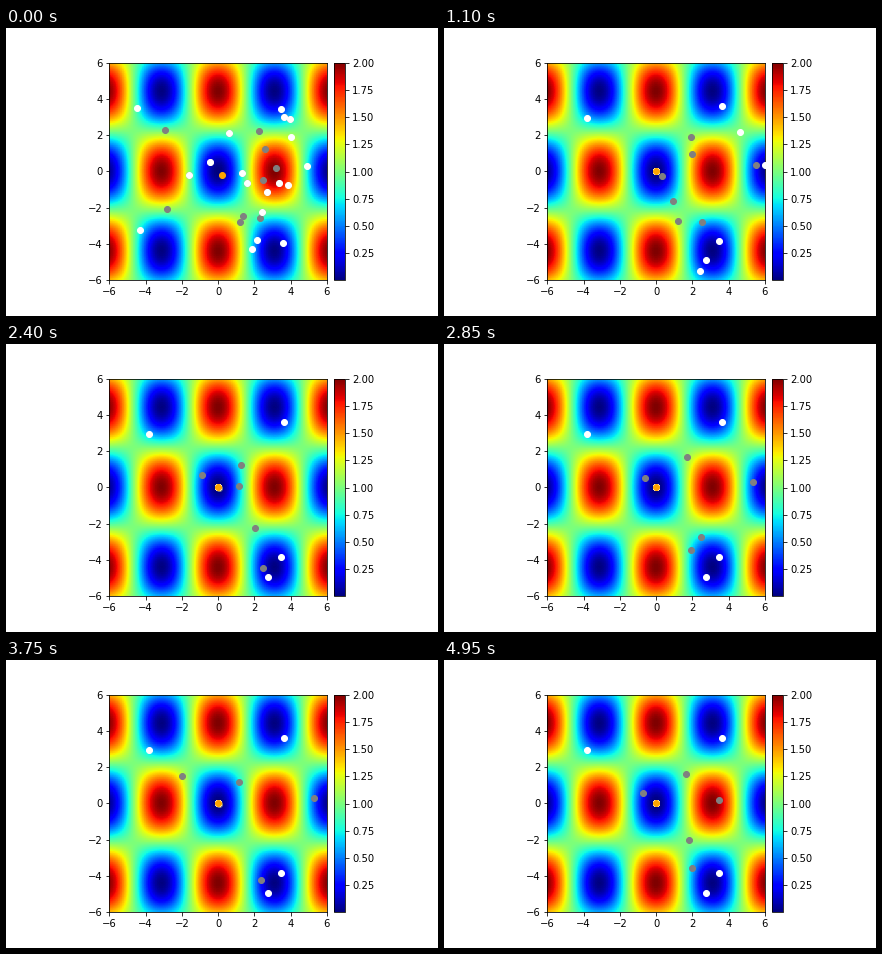
Animation of 432 by 288 pixels, one loop 5 s. Source, as a matplotlib script:

```python
import numpy as np
import matplotlib.pyplot as plt
from matplotlib.animation import FuncAnimation
from mpl_toolkits.axes_grid1 import make_axes_locatable

STEPS = 100
SETTLE = 30  # step at which the last stragglers leave the side basins

# Starting personal bests; the first seven get trapped in side basins
STARTS = np.array([
    (-4.49, 3.49), (3.48, 3.41), (3.57, -3.98), (2.13, -3.79), (4.89, 0.29),
    (1.88, -4.29), (4.01, 1.89), (-4.32, -3.24), (3.84, -0.73), (0.59, 2.11),
    (-0.43, 0.51), (-1.62, -0.23), (1.30, -0.12), (1.58, -0.67),
    (2.71, -1.17), (3.35, -0.67), (3.62, 3.00), (3.95, 2.88), (2.41, -2.25)])
TRAPPED = 7
# Drift of the trapped bests along their rays, before and after settling
GROWTH = np.array([0.85, 1.05, 0.97, 1.30, 1.23, 1.29, 1.15])[:, None]
LATE = np.array([1, 1, 1, 1, 1.05, 0, 0])[:, None]


def griewank(x, y):
    return 1 + (x**2 + y**2) / 4000 - np.cos(x) * np.cos(y / np.sqrt(2))


def fly(seed):
    """Particle swarm pulled between personal bests and the origin."""
    rng = np.random.default_rng(seed)
    best, pos = STARTS.copy(), STARTS.copy()
    pos[:TRAPPED + 2] *= 0.65
    vel = np.zeros_like(pos)
    home = STARTS[:TRAPPED] * GROWTH
    positions, bests = [], []
    for step in range(STEPS):
        fade = np.ones((len(pos), 1))
        fade[TRAPPED:] = np.clip((24 - step) / 8, 0, 1)
        positions.append(pos * fade)
        bests.append(best * fade)

        r1, r2 = rng.uniform(0, 1, (2, len(pos), 1))
        vel = 0.5 * vel + r1 * (best - pos) - r2 * pos
        pos = pos + vel

        closer = np.hypot(*pos.T) < np.hypot(*best.T)
        closer[:TRAPPED] = False
        best[closer] = pos[closer]
        hop = rng.random((TRAPPED, 1)) < 0.25
        best[:TRAPPED] += 0.7 * hop * (home - best[:TRAPPED])
        if step == SETTLE:
            home = home * LATE
            best[:TRAPPED] = home
    return np.array(positions), np.array(bests)


positions, bests = fly(seed=7)
decay = np.exp(-np.arange(STEPS) / 8)
leader = decay[:, None, None] * np.array([(0.23, -0.18)])

fig, ax = plt.subplots(figsize=(6, 4), dpi=72, facecolor="white")
fig.subplots_adjust(left=0.124, right=0.9, bottom=0.125, top=0.88)

grid = np.linspace(-6, 6, 100)
image = ax.imshow(griewank(*np.meshgrid(grid, grid)), cmap="jet",
                  origin="lower", extent=(-6, 6, -6, 6))
ax.set(xlim=(-6, 6), ylim=(-6, 6),
       xticks=range(-6, 7, 2), yticks=range(-6, 7, 2))
cax = make_axes_locatable(ax).append_axes("right", size="5%", pad=0.1)
fig.colorbar(image, cax=cax, ticks=np.arange(0.25, 2.01, 0.25), format="%.2f")

layers = [(ax.plot([], [], "o", ms=6, mew=1, color=color, zorder=z)[0], data)
          for z, (color, data) in enumerate(
              [("gray", positions), ("white", bests), ("orange", leader)], 3)]


def draw(step):
    for dots, data in layers:
        dots.set_data(data[step, :, 0], data[step, :, 1])
    return [dots for dots, _ in layers]


anim = FuncAnimation(fig, draw, frames=STEPS, init_func=lambda: draw(0),
                     interval=50, repeat=True, repeat_delay=0)
plt.show()
```
